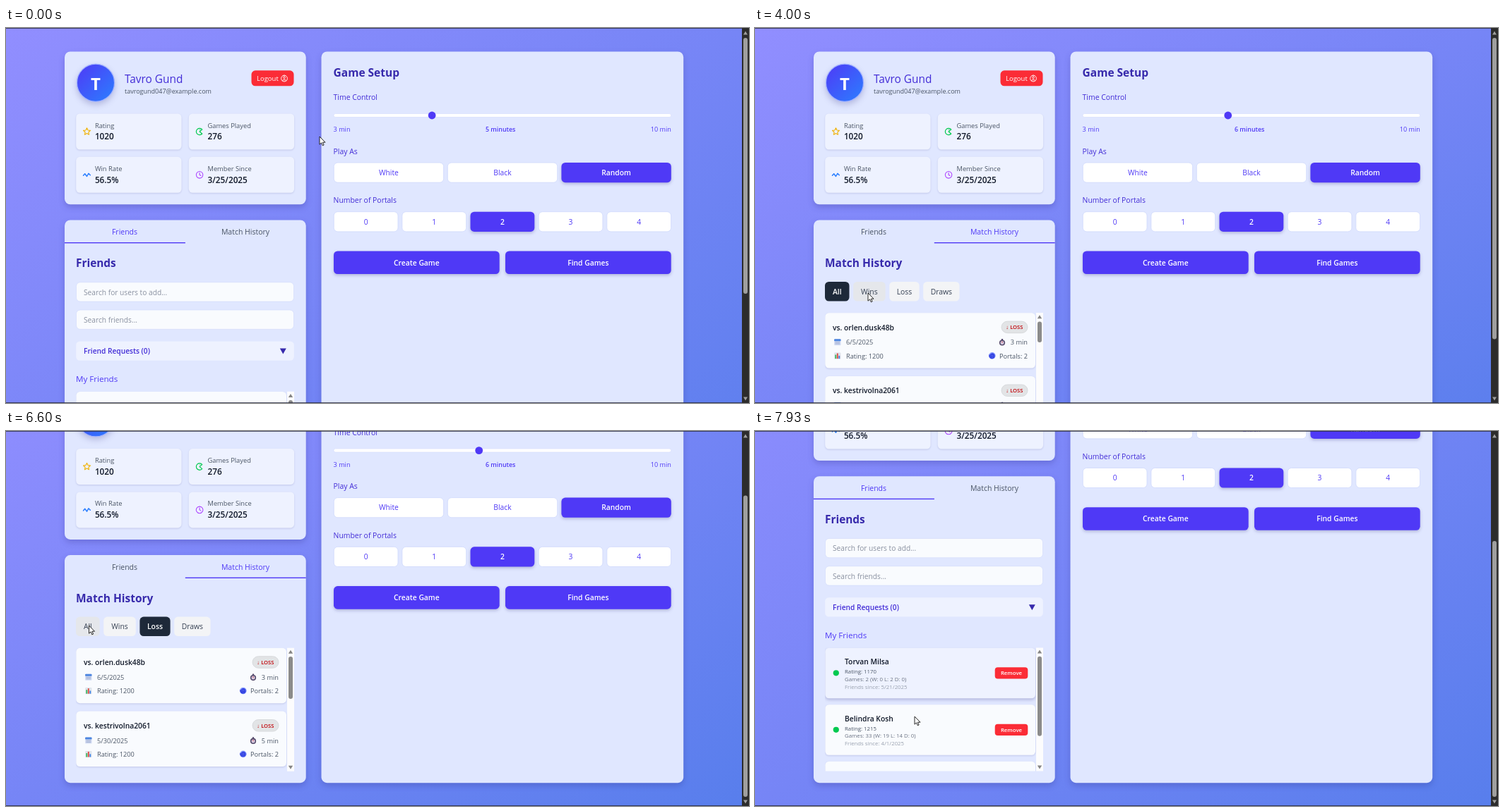
These frames come from a looping animation (1052x532 px, 8000 ms). An HTML page:

```html
<!DOCTYPE html>
<html lang="en">
<head>
<meta charset="utf-8">
<title>Game lobby</title>
<style>
  html, body { margin: 0; width: 100%; height: 100%; overflow: hidden; }
  svg { display: block; }
  text { font-family: "Open Sans", "Noto Sans", sans-serif; }
  .panel { filter: drop-shadow(0 4px 4px #1e1b7038); }
  .lift { filter: drop-shadow(0 1px 1px #1e1b7026); }
  .raised { filter: drop-shadow(0 2px 2px #1e1b7040); }
</style>
</head>
<body>
<svg id="stage" width="1052" height="532" viewBox="0 0 1052 532">
  <defs>
    <linearGradient id="sky" x2="1" y2="1">
      <stop stop-color="#918eff"/><stop offset=".5" stop-color="#7685f6"/><stop offset="1" stop-color="#587eec"/>
    </linearGradient>
    <linearGradient id="avatar" x2="1" y2="1">
      <stop stop-color="#4f39f6"/><stop offset="1" stop-color="#2b7fff"/>
    </linearGradient>
  </defs>
  <g id="page"></g>
  <path d="M0 .5H1042M0 531.5H1042" stroke="#26283c" stroke-opacity=".8"/>
  <rect x="1042" width="10" height="532" fill="#2c2c2c"/>
  <path d="M1044 9.5h6l-3-5zM1044 523.5h6l-3 5z" fill="#9f9f9f"/>
  <rect id="thumb" x="1044" width="6" rx="3" fill="#9f9f9f"/>
  <path id="cursor" d="M0 0V11.2L2.6 8.8 4.3 12.8 6.1 12 4.4 8.2H8Z" fill="#fff" stroke="#111" stroke-width=".9" stroke-linejoin="round"/>
</svg>
<script>
const LOOP = 8000;
const INDIGO = '#4f39f6', DEEP = '#432dd7', NAVY = '#372aac', PALE = '#eef2ff', PANEL = '#e0e7ff';
const INK = '#101828', GRAY = '#4a5565', SNOW = '#f9fbfe', RED = '#fb2c36';
const $ = id => document.getElementById(id);

const text = (x, y, str, size, fill, weight = 400, anchor = 'start') =>
  `<text x="${x}" y="${y}" font-size="${size}" fill="${fill}" font-weight="${weight}" text-anchor="${anchor}">${str}</text>`;
const box = (x, y, w, h, r, fill, extra = '') =>
  `<rect x="${x}" y="${y}" width="${w}" height="${h}" rx="${r}" fill="${fill}" ${extra}/>`;
const path = (d, stroke, width = 1, fill = 'none') =>
  `<path d="${d}" fill="${fill}" stroke="${stroke}" stroke-width="${width}" stroke-linejoin="round" stroke-linecap="round"/>`;
const disc = (x, y, r, fill, extra = '') => `<circle cx="${x}" cy="${y}" r="${r}" fill="${fill}" ${extra}/>`;
const at = (x, y, content) => `<g transform="translate(${x} ${y})">${content}</g>`;

function option(x, y, w, h, label, active) {
  const style = active ? 'class="raised"' : 'stroke="#cfd8fb" stroke-width=".8"';
  return box(x, y, w, h, 5.5, active ? INDIGO : '#fff', style) +
    text(x + w / 2, y + h / 2 + 3.8, label, 10.3, active ? '#fff' : INDIGO, active ? 600 : 400, 'middle');
}

const star = 'M' + Array.from({ length: 10 }, (_, i) => {
  const r = i % 2 ? 2.5 : 5.2, a = i * Math.PI / 5;
  return `${(r * Math.sin(a)).toFixed(2)} ${(-r * Math.cos(a)).toFixed(2)}`;
}).join('L') + 'Z';
const spiral = 'M' + Array.from({ length: 30 }, (_, i) => {
  const r = .5 + i * .125, a = i * .55;
  return `${(r * Math.cos(a)).toFixed(2)} ${(r * Math.sin(a)).toFixed(2)}`;
}).join('L');

const icons = {
  star: path(star, '#f0b100', 1.1),
  pac: path('M3.6-3A4.7 4.7 0 1 0 3.6 3L0 0Z', '#00c950', 1.2) + disc(.6, -2.6, .6, '#00c950'),
  wave: path('M-5 1L-2.8-1.6 0 2.2 2.4-2 4.8 .4', '#2b7fff', 1.5),
  clock: path('M0-4.8A4.8 4.8 0 1 1-.01-4.8M0-2.8V0L1.8 1.2', '#ad46ff', 1.1),
  user: path('M0-4.4A4.4 4.4 0 1 1-.01-4.4M0-2.6A1.4 1.4 0 1 1-.01-2.6M-2.8 3.2C-2 1.2 2 1.2 2.8 3.2', '#fff', 1),
  calendar: box(-4.7, -4.5, 9.4, 9, 1, '#d3dcf3') + box(-4.7, -4.5, 9.4, 3, 1, '#4d86e0') +
    path('M-3 .2H3M-3 2.3H3', '#8d9cc4', .8),
  chart: box(-4.6, -4.6, 9.2, 9.2, .8, '#dfe4ec') + box(-3.4, -1.5, 1.8, 5.5, 0, '#35b35a') +
    box(-.9, -3.6, 1.8, 7.6, 0, '#e0483e') + box(1.6, -.2, 1.8, 4.2, 0, '#3f7fe0'),
  watch: box(-1.2, -5, 2.4, 2, .4, '#54496b') + disc(0, .6, 4.1, '#54496b') + disc(0, .6, 2.5, '#d8cfe4') +
    path('M0 .6V-1.1', '#d0343a', .8),
  swirl: disc(0, 0, 4.8, '#8ea0ff') + path(spiral, '#2f3fe0', 1.2)
};

const stat = (x, y, icon, label, value) =>
  box(x, y, 149.3, 51, 5.5, PALE, 'class="lift"') + at(x + 15.3, y + 25.5, icons[icon]) +
  text(x + 26.7, y + 20, label, 9.3, GRAY, 500) + text(x + 26.7, y + 36.8, value, 11.8, INK, 600);

const profile = () =>
  box(83, 33.5, 341.7, 216.8, 8, PANEL, 'class="panel"') +
  disc(127, 77.7, 26.6, 'url(#avatar)', 'stroke="#a3b3ff" stroke-width="1.3" class="panel"') +
  text(127, 87.6, 'T', 24, '#fff', 700, 'middle') +
  text(168, 78, 'Tavro Gund', 15.4, DEEP, 500) +
  text(168, 93, 'tavrogund047@example.com', 9, GRAY) +
  box(347.5, 60.3, 60, 22, 5.5, RED) + text(355, 75, 'Logout', 9.5, '#fff', 500) + at(394, 71.5, icons.user) +
  stat(99.2, 121.5, 'star', 'Rating', '1020') + stat(258.8, 121.5, 'pac', 'Games Played', '276') +
  stat(99.2, 182.8, 'wave', 'Win Rate', '56.5%') + stat(258.8, 182.8, 'clock', 'Member Since', '3/25/2025');

const setup = (minutes, bottom) =>
  box(446.5, 33.5, 512.7, bottom - 33.5, 8, PANEL, 'class="panel"') +
  text(463.6, 68.7, 'Game Setup', 15.5, NAVY, 700) +
  text(463.6, 102, 'Time Control', 10.4, DEEP, 500) +
  box(464, 121.5, 477.7, 5, 2.5, '#fff', 'stroke="#d3dbfb" stroke-width=".6"') +
  disc(470 + (minutes - 3) * 66.57, 124, 5.4, INDIGO) +
  text(463.6, 147, '3 min', 9.1, INDIGO) +
  text(700.2, 147, minutes + ' minutes', 8.9, INDIGO, 600, 'middle') +
  text(941.8, 147, '10 min', 9.1, INDIGO, 400, 'end') +
  text(463.6, 178.8, 'Play As', 10.4, DEEP, 500) +
  ['White', 'Black', 'Random'].map((s, i) => option(464.2 + i * 161.1, 191, 155.4, 28.2, s, i == 2)).join('') +
  text(463.6, 248.2, 'Number of Portals', 10.4, DEEP, 500) +
  [0, 1, 2, 3, 4].map(n => option(464.2 + n * 96.65, 260.7, 90.8, 28.2, n, n == 2)).join('') +
  option(464, 316.5, 234.7, 32.6, 'Create Game', true) + option(707, 316.5, 234.7, 32.6, 'Find Games', true);

// Scrolling list; its content uses coordinates local to the list.
const list = (y, cards, thumb) =>
  `<svg x="99" y="${y}" width="309" height="175.2">${cards}` +
  box(299, 0, 10, 176, 0, '#fcfcfd') +
  `<path d="M300.8 8.3h6.4l-3.2-5zM300.8 167.2h6.4l-3.2 5z" fill="#858585"/>` +
  box(301, 12.5, 6, thumb, 3, '#8b8b8b') + '</svg>';

const field = (y, hint) =>
  box(99.5, y, 308, 27.4, 5.5, SNOW, 'stroke="#d3dbfb" stroke-width=".7"') + text(110, y + 18, hint, 10.2, '#8a91a0');

const friend = (y, name, rating, games, since, hover) =>
  box(.4, y + .4, 297.6, 71.6, 5.5, hover ? PALE : SNOW, `class="${hover ? 'raised' : 'lift'}"`) +
  (name ? disc(15.8, y + 36, 4.1, '#00c950') + text(28, y + 24, name, 10.3, INK, 600) +
    text(28, y + 37, 'Rating: ' + rating, 7.8, GRAY) + text(28, y + 47.7, 'Games: ' + games, 7.8, '#6a7282') +
    text(28, y + 58.6, 'Friends since: ' + since, 7.8, '#99a1af') +
    box(240.7, y + 28, 46.6, 16.2, 4, RED) + text(264, y + 39.2, 'Remove', 7.8, '#fff', 600, 'middle') : '');

const friends = hover =>
  text(99, 339, 'Friends', 15.4, NAVY, 700) +
  field(360.7, 'Search for users to add...') + field(400, 'Search friends...') +
  box(99.2, 444.5, 308.6, 27.3, 5.5, PALE) + text(110, 462.3, 'Friend Requests (0)', 10.2, DEEP, 600) +
  `<path d="M387.8 454.6h9l-4.5 8z" fill="${NAVY}"/>` +
  text(99, 502, 'My Friends', 11.6, INDIGO, 500) +
  list(515.6, friend(0, 'Torvan Milsa', 1170, '2 (W: 0 L: 2 D: 0)', '5/21/2025', hover == 'friend') +
    friend(80.5, 'Belindra Kosh', 1215, '33 (W: 19 L: 14 D: 0)', '4/1/2025') + friend(161, ''), 113);

const match = (y, name, date, minutes) =>
  box(.3, y + .3, 297.7, 78.4, 5.5, SNOW, 'class="lift"') +
  text(11, y + 24.7, 'vs. ' + name, 10.3, INK, 600) +
  box(250, y + 12.2, 37, 16.6, 8.3, '#e2e4e6', 'stroke="#cfd1d4" stroke-width=".7"') +
  text(268.4, y + 23.3, '↓ LOSS', 7.6, '#c10007', 600, 'middle') +
  at(17.8, y + 41.8, icons.calendar) + text(30, y + 45.6, date, 9.2, GRAY) +
  at(251, y + 42, icons.watch) + text(287, y + 45.6, minutes + ' min', 9.2, GRAY, 400, 'end') +
  at(17.8, y + 61.2, icons.chart) + text(30, y + 64.9, 'Rating: 1200', 9.2, GRAY) +
  at(236.8, y + 61, icons.swirl) + text(287, y + 64.9, 'Portals: 2', 9.2, GRAY, 400, 'end');

const FILTERS = [['All', 33.6], ['Wins', 45.6], ['Loss', 42.3], ['Draws', 51.3]];
function filterButtons(filter) {
  let x = 99;
  return FILTERS.map(([label, base]) => {
    const w = base + (label == filter ? .9 : 0), button = { label, x, w };
    x += w + 5.6;
    return button;
  });
}

const history = (filter, hover, loaded) =>
  text(99, 339, 'Match History', 15.5, NAVY, 700) +
  filterButtons(filter).map(({ label, x, w }) => {
    const on = label == filter;
    return box(x, 360, w, 27.5, 5.5, on ? '#1e2939' : label == hover ? '#e5e7eb' : '#f3f4f6') +
      text(x + w / 2, 377.8, label, 10.4, on ? '#fff' : '#364153', on ? 600 : 400, 'middle');
  }).join('') +
  (loaded ? list(403.9, match(0, 'orlen.dusk48b', '6/5/2025', 3) + match(89.8, 'kestrivolna2061', '5/30/2025', 5),
    filter == 'Loss' ? 60 : 29.5) : '');

function render({ tab, filter, hover, loaded, minutes, height }) {
  const onFriends = tab == 'friends', bottom = height - 32.8;
  return box(0, 0, 1042, height, 0, 'url(#sky)') + profile() + setup(minutes, bottom) +
    box(83, 272.5, 341.7, bottom - 272.5, 8, PANEL, 'class="panel"') +
    text(168, 293.4, 'Friends', 10.5, onFriends ? INDIGO : GRAY, 500, 'middle') +
    text(339, 293.4, 'Match History', 10.5, onFriends ? GRAY : INDIGO, 500, 'middle') +
    box(onFriends ? 83 : 253.8, 304, 170.9, 1.4, 0, INDIGO) +
    (onFriends ? friends(hover) : history(filter, hover, loaded));
}

// Keys are [time, value, ...]; values ease between neighbours.
function track(keys, t) {
  const i = keys.findIndex(k => k[0] > t);
  if (i < 0) return keys[keys.length - 1].slice(1);
  if (!i) return keys[0].slice(1);
  const a = keys[i - 1], b = keys[i], u = (t - a[0]) / (b[0] - a[0]), e = u * u * (3 - 2 * u);
  return a.slice(1).map((v, j) => v + (b[j + 1] - v) * e);
}

const POINTER = [
  [0, 444, 154], [220, 462, 161], [870, 600, 122], [980, 600, 122], [1280, 471, 122], [1560, 676, 121],
  [1660, 708, 120], [1740, 682, 119], [2600, 302.5, 263], [2700, 306, 256], [3000, 338, 284], [3180, 338, 284],
  [3500, 205, 347], [3930, 160, 376], [4600, 160, 376], [5000, 177, 287], [5090, 178, 287], [5300, 211, 278],
  [5640, 211, 278], [5900, 374, 330], [6120, 370, 449], [6400, 117.5, 276], [6800, 117.5, 276],
  [7080, 168, 192], [7180, 168, 192], [7400, 205, 330], [7470, 207, 334], [7680, 226, 403], [7800, 226, 403], [7930, 226, 405]
];
const SCROLL = [[0, 0], [4270, 0], [4560, 96.4], [7730, 96.4], [7930, 208.3]];

function hovered(tab, filter, x, y) {
  if (tab == 'friends') return x > 99 && x < 397 && y > 515.6 && y < 587.6 ? 'friend' : '';
  const hit = y > 360 && y < 387.5 && filterButtons(filter).find(b => x > b.x && x < b.x + b.w);
  return hit ? hit.label : '';
}

let lastKey;
function draw(now) {
  const t = now % LOOP;
  const [x, y] = track(POINTER, t), [scroll] = track(SCROLL, t);
  const tab = t >= 3070 && t < 7130 ? 'history' : 'friends';
  const filter = t >= 5300 && t < 6730 ? 'Loss' : 'All';
  const dragging = t >= 930 && t < 1560;
  const state = {
    tab, filter,
    loaded: t >= 3530,
    minutes: dragging ? 3 + Math.round((x - 470) / 66.57) : t < 930 ? 5 : 6,
    height: tab == 'friends' ? 740.3 : 628.4,
    // Hover follows a scrolling page with a short lag.
    hover: hovered(tab, filter, x, y + track(SCROLL, t - 80)[0])
  };
  const key = JSON.stringify(state);
  if (key != lastKey) $('page').innerHTML = render(state);
  lastKey = key;
  $('page').setAttribute('transform', `translate(0 ${-scroll})`);
  $('thumb').setAttribute('y', 14 + scroll / state.height * 505);
  $('thumb').setAttribute('height', 532 / state.height * 505);
  $('cursor').setAttribute('transform', `translate(${x} ${y})`);
  requestAnimationFrame(() => draw(performance.now() - start));
}
const start = performance.now();
draw(0);
</script>
</body>
</html>
```
